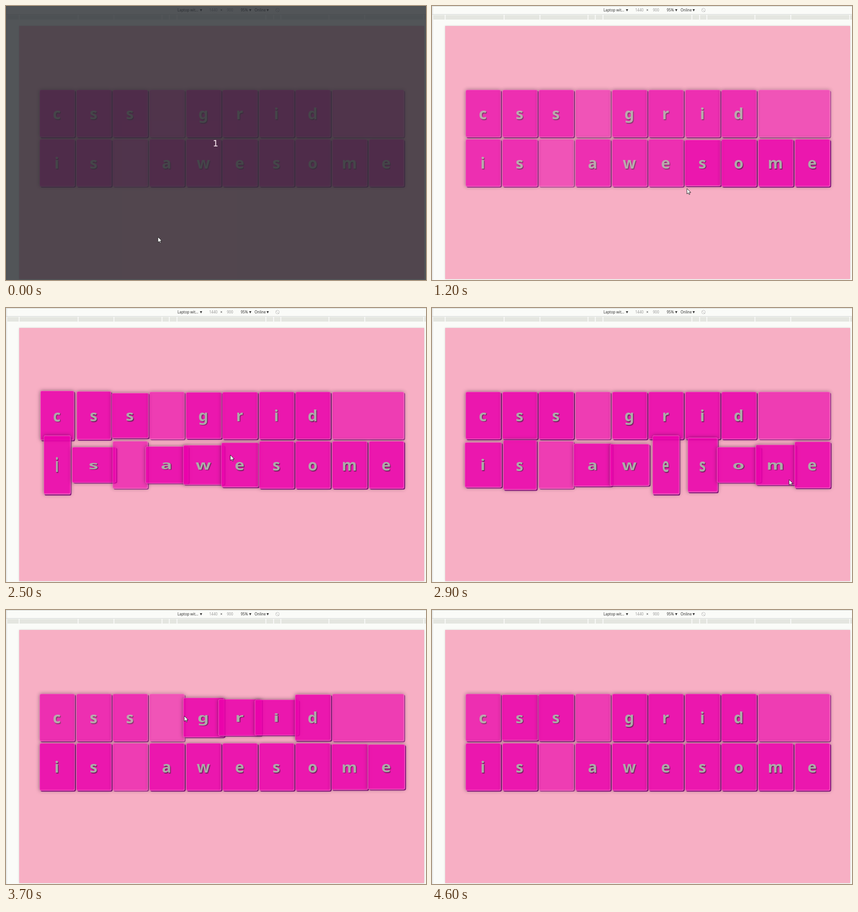
Recreate the animation shown at these times as an HTML page. Size 926 px wide and 605 px high, loop 4.7 s.

```html
<!DOCTYPE html>
<html lang="en">
<head>
<meta charset="utf-8">
<title>Rubber band tiles</title>
<style>
html, body { margin: 0; width: 100%; height: 100%; overflow: hidden; background: #fafbf8; }
svg, #shade { position: absolute; left: 0; top: 0; width: 926px; height: 605px; }
svg { font: 8px "Noto Sans", sans-serif; overflow: hidden; }
#page {
  position: absolute; left: 28.5px; top: 44px; width: 893px; height: 559px;
  background: #f7afc4; box-shadow: 0 0 4px rgba(0, 0, 0, .15);
}
.tile {
  position: absolute; box-sizing: border-box; width: 78px; height: 105px;
  border: 1px solid rgba(255, 160, 215, .45); border-radius: 4px;
  background: rgba(234, 0, 170, .87);
  box-shadow: inset -1px -1px 1px rgba(255, 150, 212, .3), 2px 2px 0 #82127a, 0 0 9px rgba(45, 20, 45, .55);
  font: 700 34px/102px "Noto Sans", sans-serif; text-align: center; text-indent: -2px;
  color: #aeaaa9; text-shadow: 1.5px 1.5px 1.5px rgba(60, 40, 60, .75);
}
.wide { width: 158.5px; }
#shade { background: rgba(40, 44, 49, .8); }
#shade span {
  position: absolute; left: 442px; width: 40px; top: 291px; text-align: center;
  font: 19px/24px "DejaVu Sans", sans-serif; color: #fdeef4;
}
</style>
</head>
<body>
<svg>
  <path d="M0 .5H926M0 18.500H926" stroke="#cfd2d0"/>
  <path d="M1.500 0V605" stroke="#d3d7da"/>
  <path d="M3 25H926" stroke="#e4e6e0" stroke-width="10"/>
  <path id="ticks" stroke="#fff" stroke-width="1.5"/>
  <g fill="#333">
    <text x="378" y="12.3">Laptop wit...</text>
    <text x="472.5" y="12.3">×</text>
    <text x="517.5" y="12.3">95%</text>
    <text x="548" y="12.3">Online</text>
    <path d="M427.500 7h5l-2.500 5zM536 7h5l-2.500 5zM574.500 7h5l-2.500 5z"/>
  </g>
  <g fill="#999">
    <text x="448" y="12.3">1440</text>
    <text x="487" y="12.3">900</text>
  </g>
  <path d="M595 6l7 7M602.500 9a4 4 0 1 1-8 0a4 4 0 1 1 8 0" fill="none" stroke="#bbb" stroke-width=".9"/>
</svg>
<div id="page"></div>
<div id="tiles"></div>
<div id="shade"><span>1</span></div>
<svg><path id="cursor" d="M0 0V12L3 9.500L5 13.500L6.700 12.700L5 8.800H8.800Z" fill="#fff" stroke="#222"/></svg>
<script>
const $ = id => document.getElementById(id);
const LOOP = 4700, STEP = 100, BAND = 1000, LAG = 40;

// Ruler marks mirror each other about the middle
$('ticks').setAttribute('d',
  [98, 115, 131, 237, 316, 446].map(d => `M${475 - d} 19V30M${475 + d} 19V30`).join(''));

// Rubber band: offset and horizontal stretch; height changes the opposite way
const band = [[0, 1], [.3, 1.25], [.4, .75], [.5, 1.15], [.65, .95], [.75, 1.05], [1, 1]]
  .map(([offset, s]) => ({ offset, easing: 'ease', transform: `scale(${s}, ${2 - s})` }));

// Turning points of the pointer: [ms, x, y]
const path = [
  [800, 335, 510], [860, 377, 490], [1020, 377, 490], [1160, 562, 403],
  [1400, 637, 292], [1523, 668, 236], [1755, 337, 203], [1915, 110, 215],
  [2168, 112, 312], [2468, 505, 325], [2556, 640, 336], [2749, 719, 345],
  [2870, 850, 410], [3065, 782, 405], [3227, 690, 291], [3284, 637, 245],
  [3535, 373, 233], [3700, 160, 183], [4150, -20, -30]
];

function pointer(t) {
  const i = Math.max(1, path.findIndex(p => p[0] > t));
  const last = path[path.length - 1];
  const [a, b] = t < last[0] ? [path[i - 1], path[i]] : [last, last];
  const k = Math.max(0, (t - a[0]) / (b[0] - a[0] || 1));
  return [1, 2].map(n => a[n] + (b[n] - a[n]) * k);
}

const tiles = [];
['css grid_', 'is awesome'].forEach((word, row) => [...word].forEach((ch, col) => {
  const el = document.createElement('div');
  const x = 74.2 + 80.6 * col, y = 185 + 108.7 * row, blank = ' _'.includes(ch);
  el.className = ch === '_' ? 'tile wide' : 'tile';
  el.style.left = x + 'px';
  el.style.top = y + 'px';
  if (!blank) el.textContent = ch;
  $('tiles').append(el);
  const anim = el.animate(band, { duration: BAND });
  anim.pause();
  tiles.push({ el, anim, blank, x, y, starts: [] });
}));

// Walk the path once: a tile at rest starts when the pointer is over it after being elsewhere
let under;
for (let t = 0; t < LOOP; t++) {
  const [px, py] = pointer(t);
  const hit = tiles.find(({ x, y, blank }) => !blank && px >= x && px < x + 78 && py >= y && py < y + 105);
  if (hit && hit !== under && !hit.starts.some(s => t < s + BAND)) hit.starts.push(t);
  under = hit;
}

// The middle stretch runs a little slower
const clock = t => t - .12 * Math.min(Math.max(t - 2500, 0), 1200);

function draw(t) {
  const now = clock(t);
  let lit = false;
  for (const { el, anim, blank, starts } of tiles) {
    const start = starts.find(s => now >= s && now < s + BAND);
    const active = start !== undefined;
    anim.currentTime = active ? now - start : -1;
    // A moving tile lights itself and every tile after it
    lit = lit || active;
    el.style.opacity = blank ? (lit ? .75 : .6) : (lit ? 1 : .84);
  }
  $('cursor').setAttribute('transform', `translate(${pointer(now - LAG)})`);
  $('shade').style.display = t < 500 ? '' : 'none';
}

const origin = performance.now();
function tick() {
  const t = (performance.now() - origin) % LOOP;
  draw(Math.floor(t / STEP) * STEP);
  requestAnimationFrame(tick);
}
tick();
</script>
</body>
</html>
```
